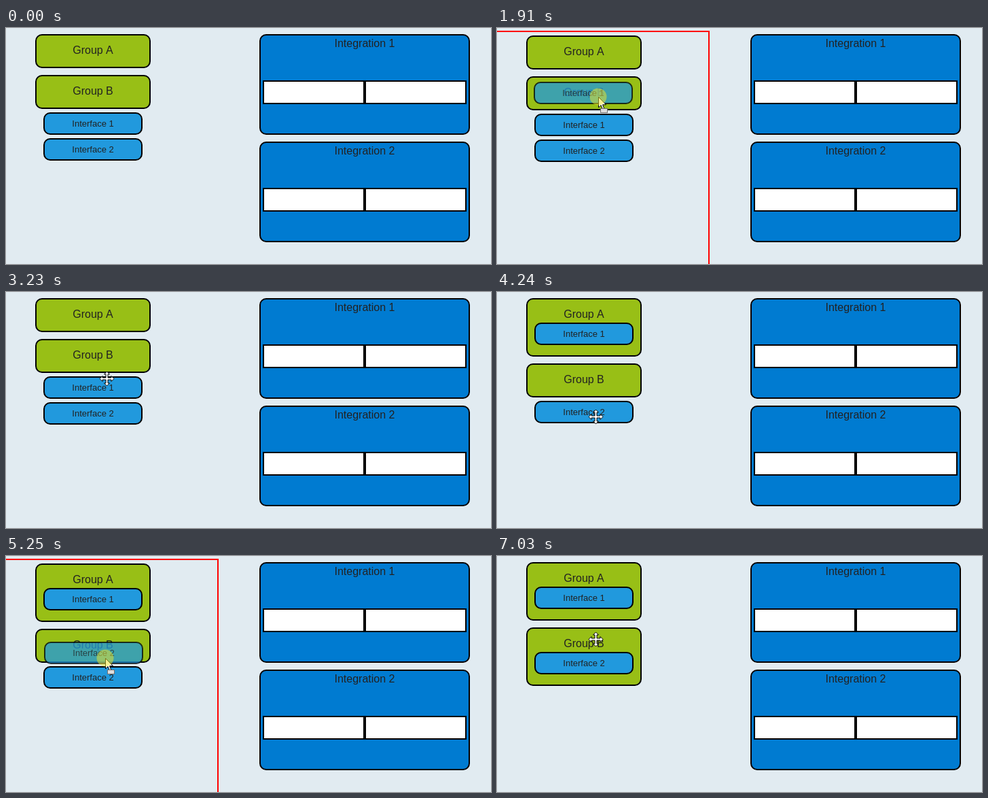
Animation of 714x347 px, one loop 8000 ms. Source, as an HTML page with a canvas:

```html
<!DOCTYPE html>
<html lang="en">
<head>
<meta charset="utf-8">
<title>Drag and drop groups</title>
<style>
html, body { margin: 0; height: 100%; overflow: hidden; background: #e1ebf1; }
canvas { display: block; }
</style>
</head>
<body>
<canvas id="stage" width="714" height="347"></canvas>
<script>
const ctx = document.getElementById('stage').getContext('2d');
const LOOP = 8000, TICKS = 104;
const GREEN = '#98bf16', BLUE = '#007bd1', LIGHT_BLUE = '#2199dd';

// Pointer path: tick, x, y
const path = [
  [3, 530, 336], [5, 505, 324], [8, 370, 258], [11, 200, 188], [13, 158, 170],
  [14, 160, 158], [15, 156, 148], [17, 151, 142], [19, 151, 142], [20, 150, 146],
  [22, 150, 146], [25, 149, 101], [28, 149, 52], [29, 149, 48], [31, 150, 45],
  [33, 149, 42], [37, 149, 42], [42, 148, 127], [48, 145, 182], [50, 145, 182],
  [51, 145, 183], [59, 145, 183], [60, 145, 184], [64, 147, 170], [70, 145, 140],
  [71, 145, 139], [87, 145, 139], [91, 145, 122]
];

// Press, drag and drop ticks, with the grip point inside the dragged box
const drags = [
  { label: 'Interface 1', press: 21, start: 23, drop: 36, gripX: 95, gripY: 22 },
  { label: 'Interface 2', press: 60, start: 61, drop: 74, gripX: 90, gripY: 24 }
];

const within = (tick, from, to) => tick >= from && tick < to;

function pointerAt(tick) {
  const i = path.findIndex(key => key[0] > tick);
  if (i === 0) return path[0].slice(1);
  if (i < 0) return path[path.length - 1].slice(1);
  const [t0, x0, y0] = path[i - 1], [t1, x1, y1] = path[i];
  const k = (tick - t0) / (t1 - t0);
  return [Math.round(x0 + (x1 - x0) * k), Math.round(y0 + (y1 - y0) * k)];
}

function box(x, y, w, h, fill, radius = 10) {
  ctx.beginPath();
  ctx.roundRect(x + 1, y + 1, w - 2, h - 2, radius && radius - 1);
  ctx.fillStyle = fill;
  ctx.fill();
  ctx.strokeStyle = '#000';
  ctx.lineWidth = 2;
  ctx.stroke();
}

function text(label, x, y, size) {
  ctx.font = `${size}px "Liberation Sans", Arial, sans-serif`;
  ctx.textAlign = 'center';
  ctx.fillStyle = '#222';
  ctx.fillText(label, x, y);
}

function group(label, y, h) {
  box(43, y, 170, h, GREEN);
  text(label, 128, y + 29, 16);
}

function item(label, x, y) {
  box(x, y, 146, 33, LIGHT_BLUE);
  text(label, x + 73, y + 21, 13);
}

function integration(label, y) {
  box(373, y, 310, 148, BLUE);
  text(label, 528, y + 19, 16);
  box(378, y + 68, 150, 35, '#fff', 0);
  box(528, y + 68, 150, 35, '#fff', 0);
}

function polygon(points) {
  ctx.beginPath();
  points.forEach(([x, y]) => ctx.lineTo(x, y));
  ctx.closePath();
  ctx.fillStyle = '#fff';
  ctx.strokeStyle = '#000';
  ctx.lineWidth = 1;
  ctx.fill();
  ctx.stroke();
}

function arrow(dragging) {
  polygon([[0.5, 0.5], [0.5, 16], [4, 12.5], [6.5, 18.5], [8.8, 17.5], [6.5, 11.8], [11.5, 11.8]]);
  if (!dragging) return;
  ctx.fillStyle = '#ddd';
  ctx.fillRect(3, 17, 11, 7);
  ctx.setLineDash([1, 1]);
  ctx.strokeRect(3.5, 17.5, 10, 6);
  ctx.setLineDash([]);
}

function moveCross() {
  let arm = [[-1.5, -1.5], [-1.5, -6.5], [-4, -6.5], [0, -10.5], [4, -6.5], [1.5, -6.5]];
  const points = [];
  for (let i = 0; i < 4; i++) {
    points.push(...arm);
    arm = arm.map(([x, y]) => [-y, x]);
  }
  ctx.translate(0.5, 0.5);
  polygon(points);
}

function drawPointer(x, y, dragging, pressed, hover) {
  ctx.save();
  ctx.translate(x, y);
  if (hover && !dragging) moveCross();
  else arrow(dragging);
  ctx.restore();
  if (!pressed) return;
  ctx.beginPath();
  ctx.arc(x, y, 12.5, 0, Math.PI * 2);
  ctx.fillStyle = 'rgba(240, 230, 40, 0.5)';
  ctx.fill();
}

function draw(tick) {
  ctx.fillStyle = '#e1ebf1';
  ctx.fillRect(0, 0, 714, 347);
  integration('Integration 1', 9);
  integration('Integration 2', 167);

  const firstIn = tick >= 55, secondIn = tick >= 82;
  const groupBY = firstIn ? 105 : 69;
  const heightA = firstIn ? 86 : 50, heightB = secondIn ? 86 : 50;
  const item1Y = firstIn ? 45 : 124;
  const item2Y = secondIn ? 141 : firstIn ? 160 : 162;
  const bordered = within(tick, 24, 29) || within(tick, 35, 38) || within(tick, 65, 70);

  ctx.save();
  if (bordered) {
    ctx.strokeStyle = '#f00';
    ctx.lineWidth = 2;
    ctx.strokeRect(-5, 5, 317, 400);
    ctx.translate(0, 2);
  }
  group('Group A', 9, heightA);
  group('Group B', groupBY, heightB);
  item('Interface 1', 55, item1Y);
  item('Interface 2', 55, item2Y);
  ctx.restore();

  if (tick < 2) return;
  const [x, y] = pointerAt(tick);
  const held = drags.find(d => within(tick, d.press, d.drop));
  const dragging = held && tick >= held.start;
  if (dragging) {
    ctx.globalAlpha = 0.75;
    item(held.label, x - held.gripX, y - held.gripY);
    ctx.globalAlpha = 1;
  }
  const areas = [[9, heightA], [groupBY, heightB], [item1Y, 33], [item2Y, 33]];
  const hover = x < 201 && areas.some(([top, h]) => within(y, top, top + h));
  drawPointer(x, y, dragging, held, hover);
}

function frame() {
  const time = performance.now() % LOOP;
  draw(Math.floor((time + 20) * TICKS / LOOP) % TICKS);
  requestAnimationFrame(frame);
}
frame();
</script>
</body>
</html>
```
